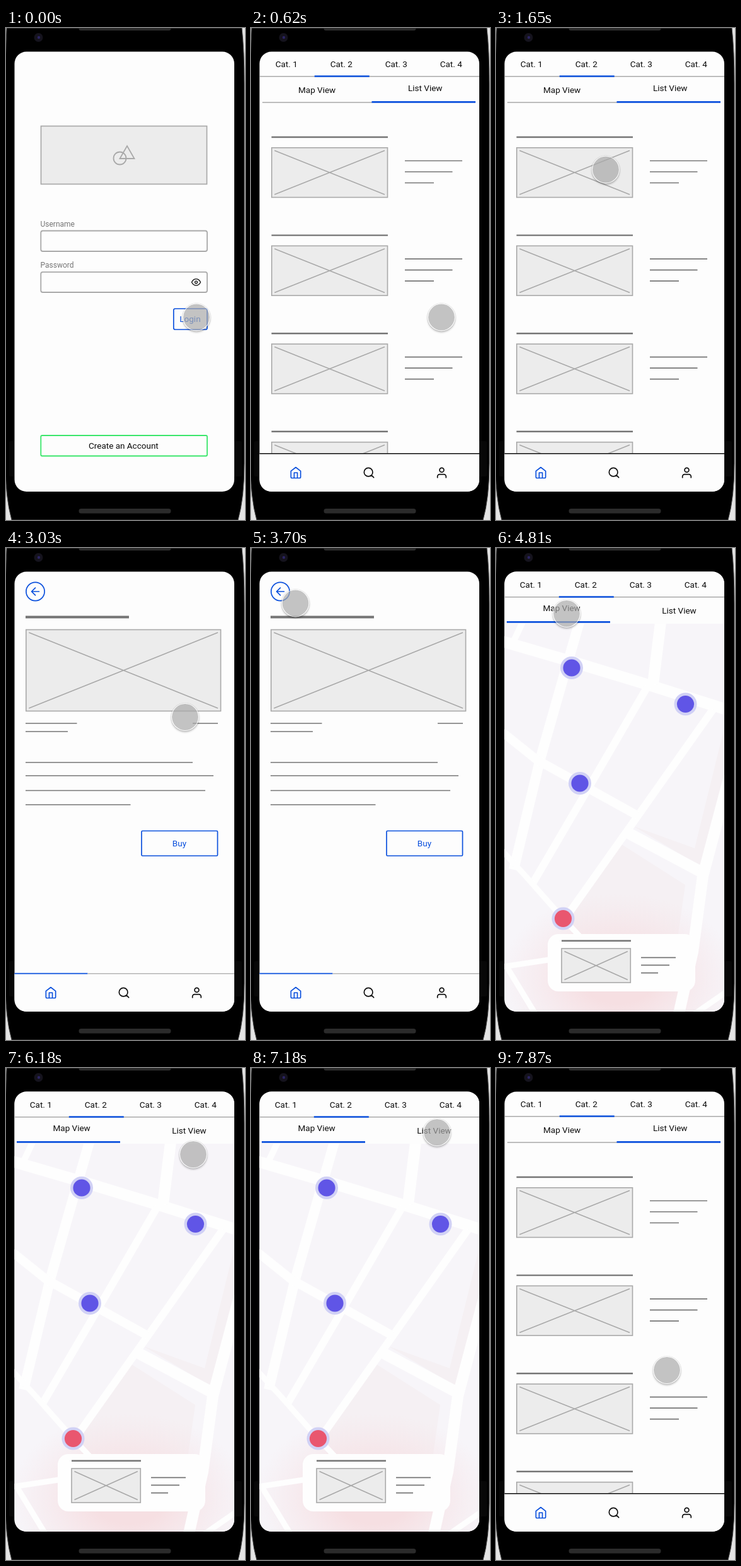
Animation, 379 px wide and 780 px high, one loop 7990 ms. Source, as an HTML page:

```html
<!DOCTYPE html>
<html lang="en">
<head>
<meta charset="utf-8">
<title>App wireframe walkthrough</title>
<style>
  html, body { margin: 0; width: 100%; height: 100%; overflow: hidden; background: #e4e4e4; }
  svg { position: absolute; left: 0; top: 0; display: block; }
  text { font: 13.5px Roboto, sans-serif; }
  #cursor {
    position: absolute; left: -22px; top: -22px; width: 44px; height: 44px;
    box-sizing: border-box; border: 1px solid rgba(255, 255, 255, .85); border-radius: 50%;
    background: rgba(170, 170, 170, .7) padding-box;
    box-shadow: 0 0 1px rgba(0, 0, 0, .45), 0 2px 3px rgba(0, 0, 0, .25);
  }
</style>
</head>
<body>
<svg id="stage" width="379" height="780" viewBox="0 0 379 780" fill="none"></svg>
<div id="cursor"></div>
<script>
const BLUE = '#0b50dd', GRAY = '#a9a9a9', DARK = '#757575', INK = '#0c0c0c';

// Drawing helpers that return SVG markup
const line = (x1, y1, x2, y2, color, width) =>
  `<path d="M${x1} ${y1}L${x2} ${y2}" stroke="${color}" stroke-width="${width}"/>`;
const rule = (x1, x2, y, width = 1.7, color = DARK) => line(x1, y, x2, y, color, width);
const box = (x1, y1, x2, y2, stroke, width, radius = 0, fill = 'none') =>
  `<rect x="${x1}" y="${y1}" width="${x2 - x1}" height="${y2 - y1}" rx="${radius}" fill="${fill}" stroke="${stroke}" stroke-width="${width}"/>`;
const disc = (x, y, r, fill) => `<circle cx="${x}" cy="${y}" r="${r}" fill="${fill}"/>`;
const label = (x, y, words, color = INK, size = 13.5) =>
  `<text x="${x}" y="${y}" fill="${color}" style="font-size:${size}px">${words}</text>`;
const picture = (x1, y1, x2, y2) => box(x1, y1, x2, y2, GRAY, 1.6, 0, '#ececec') +
  line(x1 + 4.5, y1 + 4.5, x2 - 4.5, y2 - 4.5, GRAY, 1.6) +
  line(x1 + 4.5, y2 - 4.5, x2 - 4.5, y1 + 4.5, GRAY, 1.6);
const icon = (x, y, color, d, scale = .85) =>
  `<path transform="translate(${x} ${y}) scale(${scale}) translate(-12 -12)" d="${d}" stroke="${color}" stroke-width="2" stroke-linecap="round" stroke-linejoin="round"/>`;
const repeat = (n, draw) => Array.from({ length: n }, (_, i) => draw(i)).join('');

const phone = `
  <path d="M1 0Q-1 40-1 90V690Q-1 745 9 780H368Q378 745 378 690V90Q378 35 374 0Z" fill="#000" stroke="#555"/>
  ${box(5, 655, 374, 711, 'none', 0, 2, '#070707')}
  ${box(115.5, -6, 261.5, 4, 'none', 0, 3, '#2b2b2b')}
  ${box(115.5, 762, 261.5, 769.5, 'none', 0, 3.5, '#2b2b2b')}
  ${disc(51.5, 15, 7, '#15131d')}${disc(52, 15, 2.2, '#2b2463')}
  ${box(13.5, 37.5, 362, 735, 'none', 0, 19, '#fdfdfd')}`;

const nav = box(13, 675, 363, 736, 'none', 0, 0, '#fdfdfd') +
  icon(71, 705, BLUE, 'M3 9l9-7 9 7v11a2 2 0 0 1-2 2H5a2 2 0 0 1-2-2zM9 22V12h6v10') +
  icon(187, 705, INK, 'M3 11a8 8 0 1 0 16 0a8 8 0 1 0-16 0M21 21l-4.35-4.35') +
  icon(302.5, 705, INK, 'M20 21v-2a4 4 0 0 0-4-4H8a4 4 0 0 0-4 4v2M8 7a4 4 0 1 0 8 0a4 4 0 1 0-8 0');

const tabs = (x, y) => repeat(4, i => label(x + 87 * i, y, `Cat. ${i + 1}`)) +
  rule(14, 362, y + 14.7, 1.5, GRAY) + rule(x + 62, x + 149, y + 14.5, 2.4, BLUE);

const login = box(55.5, 155.5, 318.5, 247.5, GRAY, 1.7, 0, '#ececec') +
  `<path d="M170.5 206.5a10 10 0 1 0 20 0a10 10 0 1 0-20 0M192 187L203.5 207H180.5Z" stroke="${GRAY}" stroke-width="1.8"/>` +
  label(54.5, 315, 'Username', DARK, 12) + box(55.3, 321.5, 319, 354, GRAY, 1.8, 3) +
  label(54.5, 380, 'Password', DARK, 12) + box(55.3, 386.8, 319, 419, GRAY, 1.8, 3) +
  icon(301.5, 403, INK, 'M1 12s4-8 11-8 11 8 11 8-4 8-11 8S1 12 1 12zM9 12a3 3 0 1 0 6 0a3 3 0 1 0-6 0', .64) +
  box(265.8, 445, 319, 478, BLUE, 1.7, 2.5) + label(275.3, 466, 'Login', BLUE) +
  box(55.3, 646, 319, 678.5, '#3ae66b', 1.8, 2) + label(131, 667, 'Create an Account');

const listRow = i => `<g transform="translate(0 ${155.6 * i})">` +
  rule(32.5, 217, 173, 2.4) + picture(32.8, 189.8, 216.5, 268.5) +
  rule(244, 335, 210.5) + rule(244, 319.5, 228) + rule(244, 290, 245.5) + '</g>';

const list = tabs(38.7, 62) + label(75, 102.5, 'Map View') + label(249, 99.5, 'List View') +
  rule(18, 192, 118, 1.7, GRAY) + rule(191.5, 356, 117.3, 2.8, BLUE) +
  repeat(4, listRow) + nav + rule(13, 362, 674.7, 1.6, INK);

const detail = `<circle cx="46.5" cy="69" r="14.6" stroke="${BLUE}" stroke-width="1.7"/>` +
  icon(46.5, 69, BLUE, 'M19 12H5M12 19l-7-7 7-7') +
  rule(31, 195, 109.5, 3.8) + picture(31.8, 129.5, 340.5, 258.5) +
  rule(31, 112.5, 278) + rule(296, 336, 278) + rule(31, 98, 291) +
  rule(31, 296, 340) + rule(31, 329, 361) + rule(31, 316, 384.5) + rule(31, 197.5, 407) +
  box(215, 448.5, 335.5, 488, BLUE, 1.7, 1.5) + label(263.8, 472.5, 'Buy', BLUE) +
  nav + rule(13, 129.5, 674.7, 1.8, BLUE) + rule(129.5, 362, 674.7, 1.5, '#b5b5b5');

const road = (width, d) => `<path d="${d}" stroke="#fefefe" stroke-width="${width}" stroke-linejoin="round"/>`;
const pin = (x, y, color = '#6055e6') => disc(x, y, 18, '#d1d1f5') + disc(x, y, 13.6, color);

const map = box(13, 120, 363, 736, 'none', 0, 0, '#f7f5f9') +
  '<path d="M218 441L315 476L362 285V380L330 508Z" fill="#f5f0f3"/>' +
  '<path d="M190 464L300 534L285 640H120V575Z" fill="#f5f0f3"/>' +
  box(13, 500, 363, 736, 'none', 0, 0, 'url(#glow)') +
  road(18, 'M10 148L120 180L245 218L365 256') +
  road(16, 'M132 118L107 205L70 335L28 510') +
  road(10, 'M42 118L25 154') +
  road(18, 'M261 118L249 216') +
  road(12, 'M240 220L140 392L58 532') +
  road(12, 'M344 256L214 440L112 584') +
  road(14, 'M10 292L65 336L132 373L224 424') +
  road(18, 'M206 450L330 516') +
  road(18, 'M370 362L328 520L312 640L290 738') +
  road(9, 'M10 480L45 518L106 587L135 618') +
  road(9, 'M10 664L96 651M17 664L62 738M310 742L365 704') +
  box(13, 36, 363, 120, 'none', 0, 0, '#fdfdfd') +
  tabs(37.8, 63) + label(74.5, 99.5, 'Map View') + label(263.3, 103.5, 'List View') +
  rule(17, 181, 117.4, 2.8, BLUE) +
  pin(120, 190) + pin(300.5, 247.5) + pin(133, 373) + pin(106.5, 587.5, '#e9566f') +
  box(82, 612, 316, 703, 'none', 0, 17, '#fefefe') +
  rule(104, 214, 622.7, 2.4) + picture(104, 635, 213.3, 689) +
  rule(230, 285, 649.3) + rule(230, 275, 661.3) + rule(230, 257, 673.7);

const screens = { login, list, detail, map };
document.getElementById('stage').innerHTML = `
  <defs>
    <clipPath id="glass">${box(13.5, 37.5, 362, 735, 'none', 0, 19, '#fff')}</clipPath>
    <radialGradient id="glow" gradientUnits="userSpaceOnUse" cx="0" cy="0" r="1" gradientTransform="translate(195 682) scale(190 135)">
      <stop offset=".3" stop-color="#f6dfe2"/><stop offset="1" stop-color="#f6e4e8" stop-opacity="0"/>
    </radialGradient>
  </defs>${phone}<g clip-path="url(#glass)">` +
  Object.entries(screens).map(([name, art]) => `<g id="${name}">${art}</g>`).join('') + '</g>';

const LOOP = 7990, STEP = 120;
const cuts = [[0, 'login'], [500, 'list'], [2400, 'detail'], [3940, 'list'], [4810, 'map'], [7330, 'list']];
// Cursor moves: start time, number of steps, destination
const moves = [
  [1140, 4, 179, 234], [1650, 1, 174, 224.5], [2520, 2, 284, 268], [3310, 3, 91, 104],
  [3700, 2, 50, 71], [4060, 1, 52, 73], [4180, 3, 122, 111], [4540, 2, 112, 104],
  [4930, 3, 286, 324], [5820, 4, 297, 137], [6300, 1, 302, 122], [6440, 1, 302, 120],
  [6820, 4, 295, 102], [7750, 2, 271, 479]
];
const ease = p => p * p * (3 - 2 * p);

function cursorAt(time) {
  let x = 302, y = 458.5;
  for (const [start, steps, toX, toY] of moves) {
    if (time < start) break;
    const p = ease(Math.min(1, (Math.floor((time - start) / STEP) + 1) / steps));
    x += (toX - x) * p;
    y += (toY - y) * p;
  }
  return [x, y];
}

const cursor = document.getElementById('cursor');
const groups = Object.keys(screens).map(name => document.getElementById(name));

function render() {
  const time = performance.now() % LOOP;
  const current = cuts.filter(([start]) => start <= time).pop()[1];
  for (const group of groups) group.style.display = group.id === current ? '' : 'none';
  const [x, y] = cursorAt(time);
  cursor.style.transform = `translate(${x}px, ${y}px)`;
  requestAnimationFrame(render);
}
render();
</script>
</body>
</html>
```
